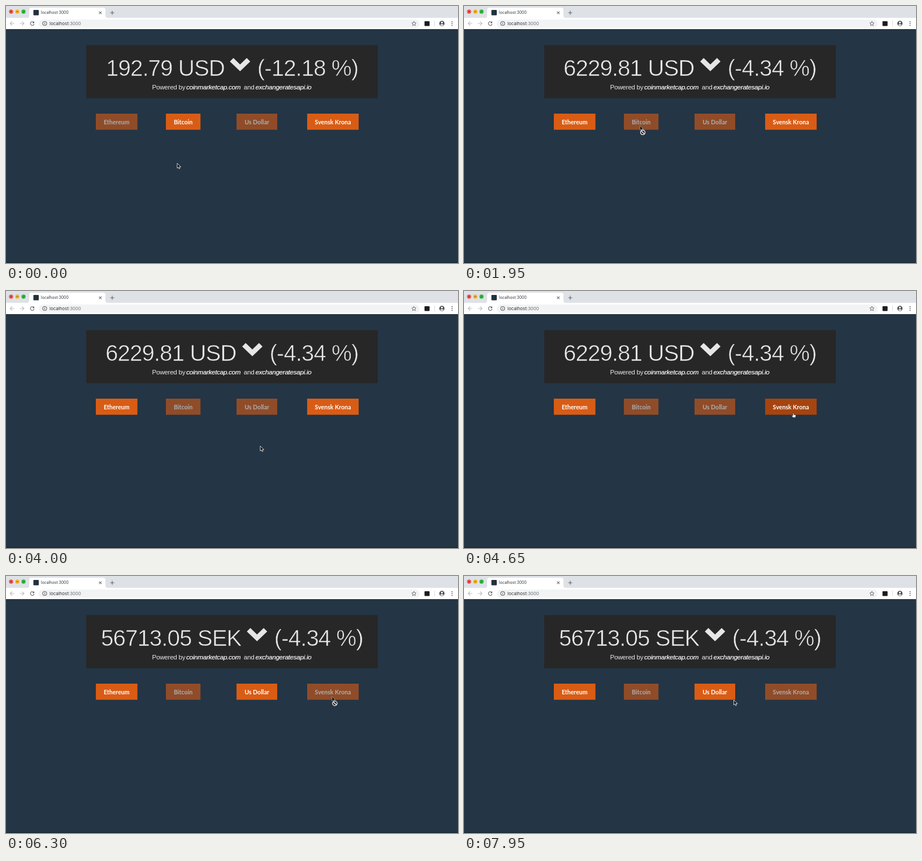
An HTML page for the animation above (8 s loop, 800x456 px).

```html
<!DOCTYPE html>
<html lang="en">
<head>
<meta charset="utf-8">
<title>Exchange rates</title>
<style>
  html, body { margin: 0; width: 100%; height: 100%; overflow: hidden; background: #243545; }
  svg { display: block; width: 100%; height: 100%; }
  .ui { font-family: Inter, Roboto, sans-serif; fill: #303236; }
  .line { fill: none; stroke: #5f6368; stroke-width: 1.1; }
  .sans { font-family: "Liberation Sans", Arial, sans-serif; fill: #e9e9e9; }
  /* A stroke in the panel colour thins the letters to a light weight. */
  .rate { font-size: 40.4px; letter-spacing: -1px; stroke: #272727; stroke-width: .7px; }
  .credit { font-size: 11.7px; letter-spacing: -.3px; }
  .credit .site { font-style: italic; fill: #fff; stroke: #fff; stroke-width: .2px; }
  .button text { font: 700 10.6px Lato, sans-serif; fill: #fff; text-anchor: middle; }
</style>
</head>
<body>
<svg viewBox="0 0 800 456">
  <rect width="800" height="456" fill="#243545"/>
  <rect y="455" width="800" height="1" fill="#14202b"/>

  <g id="browser">
    <rect width="800" height="21" fill="#dee1e6"/>
    <rect y="21" width="800" height="20" fill="#fff"/>
    <circle cx="9" cy="10" r="3.7" fill="#f9564f"/>
    <circle cx="20" cy="10" r="3.7" fill="#f5b52e"/>
    <circle cx="31" cy="10" r="3.7" fill="#2fb83f"/>
    <path d="M7.5 8.5l3 3m0-3l-3 3M18 10h4M29.5 11.5l3-3" fill="none" stroke="#403020" stroke-opacity=".75" stroke-width=".9"/>
    <path d="M37 21q4 0 4-4V7q0-4 4-4h127q4 0 4 4v10q0 4 4 4z" fill="#fff"/>
    <rect x="48.5" y="7" width="9.5" height="9.5" rx="1" fill="#20303d"/>
    <text class="ui" x="62" y="14.2" font-size="6.9">localhost:3000</text>
    <path class="line" d="M164.7 9.8l4.4 4.4m0-4.4l-4.4 4.4M184.5 12h7m-3.5-3.5v7"/>
    <path class="line" style="stroke:#bbbdc0" d="M14.8 31H7.5m3.4-3.5L7.4 31l3.5 3.5M24.5 31h7.3m-3.4-3.5l3.5 3.5-3.5 3.5"/>
    <path class="line" d="M49.2 29.2A3.3 3.3 0 1 0 49.7 32"/>
    <path d="M50 27v3.4h-3.4z" fill="#5f6368"/>
    <rect x="58" y="24" width="674" height="14.5" rx="7.2" fill="#f1f3f4"/>
    <circle class="line" cx="68.5" cy="31" r="3.5"/>
    <path class="line" d="M68.5 30.5v2.3m0-3.9v.9"/>
    <text class="ui" x="77" y="33.9" font-size="7.9">localhost<tspan fill="#6b6e72">:3000</tspan></text>
    <path class="line" style="stroke-width:.9" d="M722 27.2l1.1 2.6 2.8.3-2.1 1.9.6 2.8-2.4-1.5-2.4 1.5.6-2.8-2.1-1.9 2.8-.3z"/>
    <rect x="740.7" y="27" width="9" height="8.5" rx="1.2" fill="#1d1d1d"/>
    <path d="M758.5 26v10" stroke="#dadce0"/>
    <circle cx="771.5" cy="31" r="4.7" fill="#50545a"/>
    <circle cx="771.5" cy="29.4" r="1.6" fill="#fff"/>
    <path d="M768.3 33.6q3.2-2.9 6.4 0-3.2 2.6-6.4 0z" fill="#fff"/>
    <g fill="#50545a">
      <circle cx="789.5" cy="28" r=".9"/><circle cx="789.5" cy="31.2" r=".9"/><circle cx="789.5" cy="34.4" r=".9"/>
    </g>
  </g>

  <rect x="142" y="69.5" width="516" height="94" fill="#272727"/>
  <text id="amount" class="sans rate" y="124.3"></text>
  <path id="chevron" d="M0 7.2L6.2 1 18 12.4 29.8 1 36 7.2 18 24.4z" fill="#e6e6e6"/>
  <text id="change" class="sans rate" y="124.3"></text>
  <g class="sans credit">
    <text x="258.5" y="148">Powered by</text>
    <text x="319" y="148" class="site">coinmarketcap.com</text>
    <text x="420.8" y="148">and</text>
    <text x="441.5" y="148" class="site">exchangeratesapi.io</text>
  </g>

  <g id="buttons"></g>

  <g id="cursor">
    <path id="arrow" d="M0 0V8.8L2 7 3.3 10 4.9 9.3 3.6 6.4H6.4z" fill="#111" stroke="#fff" stroke-width=".8"/>
    <g id="denied">
      <path d="M0 0V8L1.9 6.4 3 9 4.4 8.4 3.3 5.8H5.8z" fill="#111" stroke="#ddd" stroke-width=".5"/>
      <g fill="none">
        <circle cx="5" cy="12" r="4" fill="#333" stroke="#222" stroke-width="2.4"/>
        <path d="M2.2 9.2l5.6 5.6" stroke="#fff" stroke-width="1.3"/>
        <circle cx="5" cy="12" r="4.1" stroke="#fff" stroke-width="1.3"/>
      </g>
    </g>
    <path id="hand" d="M-1 .7Q0-.5.9.7V3.3L3.6 3.8Q4.6 4.1 4.4 5.4L3.6 8.7H-.8L-3 5.6Q-3 4.3-1.8 4.7L-1 5.4z"
      fill="#fff" stroke="#111" stroke-width=".7"/>
  </g>
</svg>
<script>
const LOOP = 8000, STEP = 50;
const el = id => document.getElementById(id);

// Times at which a click registers and its new rate arrives.
const BITCOIN_CLICK = 1800, BITCOIN_RATE = 1950;
const KRONA_CLICK = 5000, KRONA_RATE = 5150;

const rates = [
  { from: 0, amount: '192.79 USD', change: '(-12.18 %)', x: 177, chevron: 396.3 },
  { from: BITCOIN_RATE, amount: '6229.81 USD', change: '(-4.34 %)', x: 176, chevron: 418 },
  { from: KRONA_RATE, amount: '56713.05 SEK', change: '(-4.34 %)', x: 168, chevron: 426.3 }
];

const TOP = 191, BOTTOM = 219.6;
const buttons = [
  { label: 'Ethereum', left: 159, right: 232.6, enabled: t => t >= BITCOIN_CLICK },
  { label: 'Bitcoin', left: 283, right: 344.2, enabled: t => t < BITCOIN_CLICK },
  { label: 'Us Dollar', left: 408, right: 480, enabled: t => t >= KRONA_CLICK },
  { label: 'Svensk Krona', left: 533, right: 624.2, enabled: t => t < KRONA_CLICK }
];

// Pointer path: time, x, y
const path = [
  [0, 303, 279], [900, 303, 279], [1250, 312, 217.5], [1750, 312, 217.5],
  [2100, 311, 208.5], [3450, 311, 208.5], [3750, 340, 262], [4000, 450, 275],
  [4300, 560, 236], [4600, 583, 216], [4900, 583, 216], [5050, 582, 210],
  [5950, 582, 210], [6300, 577, 214], [6600, 572, 234], [6850, 560, 236],
  [7300, 510, 236], [7650, 487, 223], [7950, 477.5, 220], [LOOP, 477.5, 220]
];

for (const b of buttons) {
  el('buttons').insertAdjacentHTML('beforeend',
    `<g class="button"><rect x="${b.left}" y="${TOP}" width="${b.right - b.left}" height="${BOTTOM - TOP}"/>
     <text x="${(b.left + b.right) / 2}" y="209.5">${b.label}</text></g>`);
  b.node = el('buttons').lastElementChild;
}

function pointerAt(t) {
  const i = path.findIndex(key => key[0] > t);
  const [t0, x0, y0] = path[i - 1], [t1, x1, y1] = path[i];
  const k = (t - t0) / (t1 - t0);
  return [x0 + (x1 - x0) * k, y0 + (y1 - y0) * k];
}

function draw(t) {
  const rate = rates.findLast(r => t >= r.from);
  el('amount').textContent = rate.amount;
  el('amount').setAttribute('x', rate.x);
  el('chevron').setAttribute('transform', `translate(${rate.chevron} 91.3)`);
  el('change').textContent = rate.change;
  el('change').setAttribute('x', rate.chevron + 48.5);

  const [x, y] = pointerAt(t);
  let shape = 'arrow';
  for (const b of buttons) {
    const enabled = b.enabled(t);
    const over = x > b.left && x < b.right && y > TOP && y < BOTTOM;
    if (over) shape = enabled ? 'hand' : 'denied';
    b.node.setAttribute('opacity', enabled ? 1 : .6);
    b.node.firstChild.setAttribute('fill', over && enabled ? '#a6440f' : '#d95c15');
  }
  for (const id of ['arrow', 'hand', 'denied']) {
    el(id).setAttribute('display', id === shape ? 'inline' : 'none');
  }
  el('cursor').setAttribute('transform', `translate(${x} ${y})`);
}

const start = performance.now();
function tick() {
  const t = (performance.now() - start) % LOOP;
  draw(Math.floor(t / STEP) * STEP);
  requestAnimationFrame(tick);
}
tick();
</script>
</body>
</html>
```
